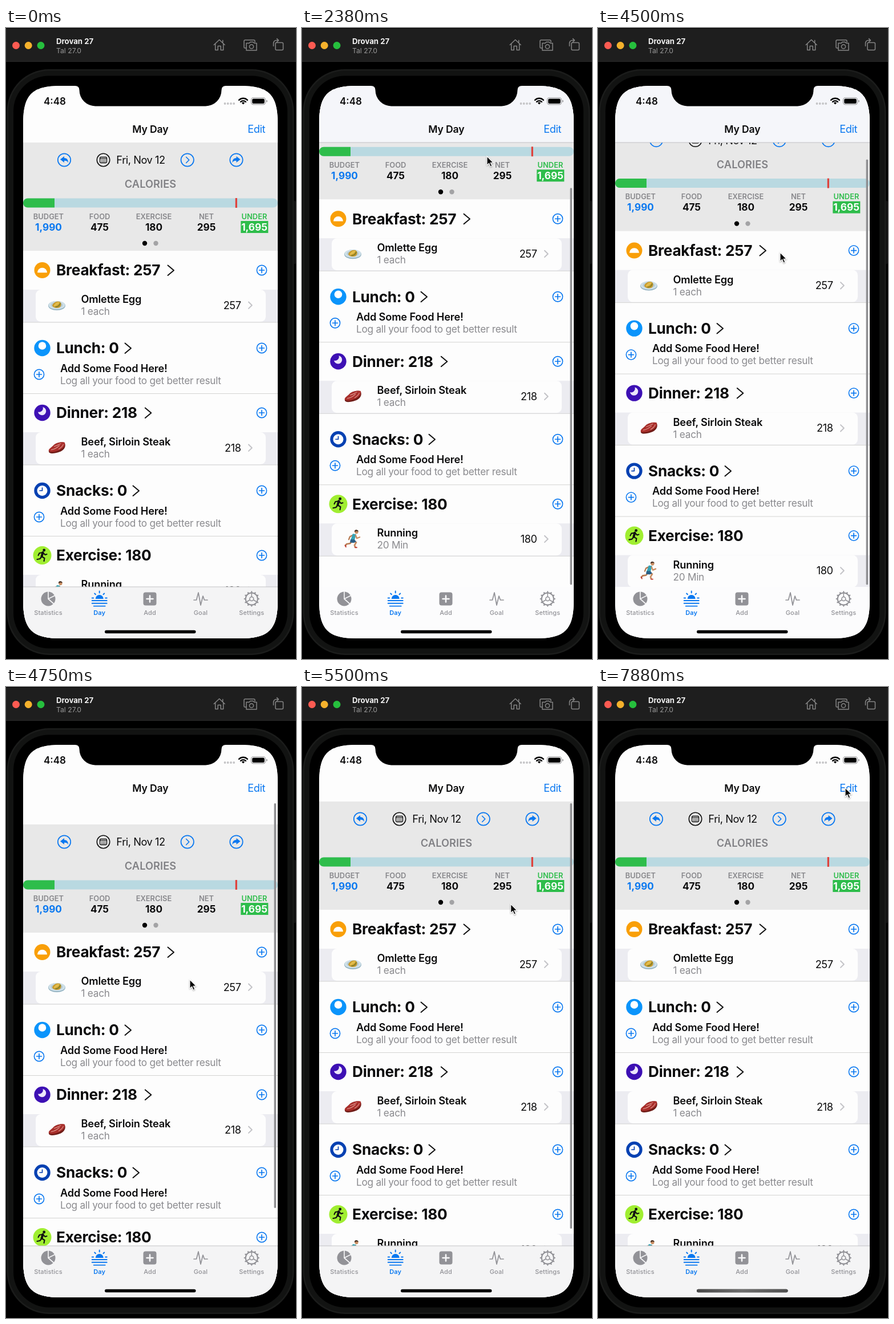
Recreate the animation shown at these times as an HTML page. Size 508 by 1102 pixels, loop 8000 ms.

```html
<!DOCTYPE html>
<html lang="en">
<head>
<meta charset="utf-8">
<title>My Day</title>
<style>
html, body { margin: 0; width: 100%; height: 100%; overflow: hidden; background: #000; }
svg { display: block; width: 100vw; height: 100vh; }
text { font-family: Inter, Roboto, sans-serif; fill: #0b0b0c; white-space: pre; }
.head { font-size: 26.2px; font-weight: 700; letter-spacing: -.01em; }
.name { font-size: 18.2px; font-weight: 600; letter-spacing: -.009em; }
.body { font-size: 18.2px; letter-spacing: -.024em; }
.note { font-size: 17.2px; letter-spacing: -.0145em; fill: #8a8a8e; }
.cap { font-size: 12.9px; font-weight: 600; fill: #87878b; }
.num { font-size: 17.2px; font-weight: 700; }
.tab { font-size: 11px; font-weight: 500; letter-spacing: .01em; fill: #929297; }
.mid { text-anchor: middle; }
.end { text-anchor: end; }
.blue { fill: #0a78f0; }
.line { fill: none; stroke-linecap: round; stroke-linejoin: round; }
</style>
</head>
<body>
<svg id="stage" viewBox="0 0 508 1102" preserveAspectRatio="none"></svg>
<script>
const BLUE = '#0a78f0', GRAY = '#929297', LOOP = 8000, STEP = 125;

const text = (x, y, cls, s, extra = '') => `<text x="${x}" y="${y}" class="${cls}" ${extra}>${s}</text>`;
const rect = (x, y, w, h, fill, r = 0, extra = '') =>
  `<rect x="${x}" y="${y}" width="${w}" height="${h}" rx="${r}" fill="${fill}" ${extra}/>`;
const disc = (x, y, r, fill) => `<circle cx="${x}" cy="${y}" r="${r}" fill="${fill}"/>`;
const line = (d, color, w) => `<path class="line" d="${d}" stroke="${color}" stroke-width="${w}"/>`;
const ring = (x, y, r, color, w) =>
  `<circle cx="${x}" cy="${y}" r="${r}" fill="none" stroke="${color}" stroke-width="${w}"/>`;
const shape = (d, fill) => `<path d="${d}" fill="${fill}"/>`;
const at = (x, y, s, extra = '') => `<g transform="translate(${x} ${y})" ${extra}>${s}</g>`;
const plus = (x, y) => at(x, y, ring(0, 0, 8.6, BLUE, 1.6) + line('M-4.4 0H4.4M0 -4.4V4.4', BLUE, 1.7));
const rule = y => rect(30, y, 446, 1, '#d4d4d2');
const spokes = (n, r1, r2) => Array.from({ length: n }, (_, i) => {
  const a = i * 2 * Math.PI / n - Math.PI / 2, c = Math.cos(a), s = Math.sin(a);
  return `M${(r1 * c).toFixed(2)} ${(r1 * s).toFixed(2)}L${(r2 * c).toFixed(2)} ${(r2 * s).toFixed(2)}`;
}).join('');

// Box with smooth, continuous corners: e is their reach, c the bend
function smoothBox(x, y, w, h, e, c) {
  const r = x + w, b = y + h;
  return `M${x + e} ${y}H${r - e}C${r - c} ${y} ${r} ${y + c} ${r} ${y + e}V${b - e}` +
    `C${r} ${b - c} ${r - c} ${b} ${r - e} ${b}H${x + e}C${x + c} ${b} ${x} ${b - c} ${x} ${b - e}` +
    `V${y + e}C${x} ${y + c} ${x + c} ${y} ${x + e} ${y}Z`;
}

// Small drawings, each centred on 0,0
const egg =
  '<ellipse cy="1" rx="15" ry="8" fill="#8fb0c0"/><ellipse rx="14.5" ry="7.3" fill="#cfe0e8"/>' +
  '<ellipse cy="-.3" rx="10.5" ry="5" fill="#b4cbd6"/>' +
  shape('M-8 1C-7 -4 0 -8 5 -6C9 -4 8 2 5 4C0 6 -6 5 -8 1Z', '#c99a2c') +
  shape('M-5 0C-2 -5 2 -6 5 -5C3 -1 -1 2 -5 2Z', '#e2bd4c') +
  line('M-2 3C2 3 5 0 6 -3', '#6f7a2a', 1.4);
const steak = '<g transform="rotate(-9)">' +
  shape('M-15 5C-15 0 -8 -2 -5 -5C0 -9 12 -9 15 -6C17 1 11 7 3 8C-4 9 -14 10 -15 5Z', '#6f1c17') +
  shape('M-15 3C-14 -1 -8 -2 -5 -5C0 -9 12 -9 15 -7C16 0 10 3 3 5C-5 7 -13 7 -15 3Z', '#a92f2b') +
  line('M-10 2C-5 2 1 0 5 -3M-4 -3C0 -3 4 -5 8 -6M3 3C8 1 11 -2 12 -4', '#dc9088', 1.2) + '</g>';
const runner =
  line('M-1 4L-5 8L-11 9L-13 12', '#b77b52', 2.6) + line('M1 4L6 6L3 11L4 14', '#c98d62', 2.8) +
  line('M1 -7L-5 -4L-7 1', '#b77b52', 2.3) +
  shape('M0 -9L6 -8L3 2L-4 2Z', '#35a3b5') + shape('M-4 1L3 1L6 5L1 7L-5 6Z', '#2b5f86') +
  line('M5 -6L7 -1L12 -3', '#c98d62', 2.4) +
  disc(6.5, -12, 3.1, '#c98d62') + shape('M3 -12C2 -17 9 -17 10 -13L6 -13.6Z', '#4a3325') +
  line('M4 15H7M-13.5 11L-12 14', '#c0392f', 1.8);

const badges = [
  disc(0, 0, 14, '#f99f08') + shape('M-8.5 4.2A8.5 8.5 0 0 1 8.5 4.2Z', '#fff'),
  disc(0, 0, 14.2, '#0b94fb') + disc(0, -4, 6.8, '#fff'),
  disc(0, 0, 14.2, '#3d10b4') + shape('M1 -10A7.2 7.2 0 1 1 -7.5 -1.5A6.8 6.8 0 0 0 1 -10Z', '#ece6fb'),
  disc(0, 0, 14.2, '#0641b2') + disc(0, 0, 9, '#fff') + line('M0 -5V0H-4.5', '#0641b2', 1.7),
  disc(0, 0, 16, '#a0ee31') + disc(3.2, -9, 2.4, '#111') +
    line('M1 -5L-1 2', '#111', 4) + line('M-1 2L4 5L3 10M-1 2L-4 6L-9 7M1 -5L-5 -4L-7 0M2 -4L5 -1L8 -2', '#111', 2.1)
];

function heading(i, y, label, arrow) {
  return at(63.5, y, badges[i]) + text(88, y + 9.3, 'head', label) +
    (arrow ? line(`M${arrow} ${y - 8.5}l10.5 8.7l-10.5 8.7`, '#111', 2) : '') + plus(448, y);
}
function foodRow(y, icon, name, note, value) {
  const mid = y + 61;
  return rect(30, y + 34, 446, 57, '#ececf1') + rect(52, y + 34, 403, 56, '#fdfdfd', 9) +
    at(84.5, mid, disc(0, 0, 11.8, '#fb382e') + line('M-5.2 0H5.2', '#fff', 2), 'class="minus"') +
    `<g class="slide">${at(89, mid, icon)}${text(131.5, y + 57, 'name', name)}${text(131.5, y + 78, 'note', note)}</g>` +
    text(411.5, mid + 6.5, 'body end', value) +
    line(`M425 ${mid - 5.5}l5.8 5.7l-5.8 5.7`, '#c3c3c7', 2) + rule(y + 90.5);
}
function addRow(y) {
  return plus(58, y + 46) + text(95, y + 41.7, 'name', 'Add Some Food Here!') +
    text(95, y + 62.7, 'note', 'Log all your food to get better result') + rule(y + 79);
}

const reply = 'M-7 -1L0 -6.5V-3.5C5 -3.5 7 0 7 5C5.5 2 4 1.3 0 1.3V4.5Z';
function header() {
  const stats = [[74.5, 'BUDGET', '1,990'], [164, 'FOOD', '475'], [259, 'EXERCISE', '180'],
    [351, 'NET', '295'], [435, 'UNDER', '1,695']];
  const colors = { BUDGET: BLUE, UNDER: '#fff' };
  let s = rect(30, 200, 446, 189, '#e8e8e8') +
    at(102, 230.5, ring(0, 0, 11.2, BLUE, 1.7) + shape(reply, BLUE)) +
    at(403.5, 230.5, ring(0, 0, 11.2, BLUE, 1.7) + `<g transform="scale(-1 1)">${shape(reply, BLUE)}</g>`) +
    at(317.7, 230.5, ring(0, 0, 11.2, BLUE, 1.7) + line('M-2 -5L3 0L-2 5', BLUE, 1.7)) +
    at(170.5, 230.5, ring(0, 0, 11.2, '#111', 1.6) +
      rect(-6, -5, 12, 10, 'none', 1.8, 'stroke="#111" stroke-width="1.3"') +
      line('M-6 -2.3H6', '#111', 1.3) +
      '<path d="M-3.8 .3H4.5M-3.8 2.8H4.5" stroke="#111" stroke-width="1.3" stroke-dasharray="1.4 1"/>') +
    text(236, 237, 'body mid', 'Fri, Nov 12') +
    text(253, 279.2, 'name mid', 'CALORIES', 'style="fill:#818185;letter-spacing:.005em"') +
    rect(30, 297.5, 446, 16, '#b9d9e1', 8) +
    shape('M85 297.5V313.5H38A8 8 0 0 1 38 297.5Z', '#2ebd4b') + rect(401.7, 297, 3.2, 17, '#e0403a') +
    rect(411.3, 337, 48, 21, '#2ebd4b') + disc(243, 376, 4.2, '#000') + disc(262.5, 376, 4.2, '#a3a3a5');
  for (const [x, label, value] of stats) {
    s += text(x, 333.5, 'cap mid', label, label === 'UNDER' ? 'style="fill:#2ebd4b"' : '') +
      text(x, 353.6, 'num mid', value, colors[label] ? `style="fill:${colors[label]}"` : '');
  }
  return s;
}

function tabs() {
  const icons = [
    disc(0, 0, 12.5, GRAY) + line('M0 -13V0L9.5 8.5M0 0L12 -6', '#f5f5f6', 1.7),
    shape('M-7 0A7 7 0 0 1 7 0Z', BLUE) +
      line('M0 -13.5V-10.5M-8.5 -9.5L-6.8 -7.7M8.5 -9.5L6.8 -7.7M-13 -1.5H-10.5M13 -1.5H10.5', BLUE, 2) +
      line('M-13 3H13M-13 7.8H13M-10 12.6H10', BLUE, 1.9),
    rect(-11.5, -11.5, 23, 23, GRAY, 4) + line('M-5.5 0H5.5M0 -5.5V5.5', '#f8f8f9', 2.6),
    line('M-12 2H-7.5L-4 -11L0 11L4 -5L6.5 2H12', GRAY, 1.7),
    ring(0, 0, 10.6, GRAY, 2) + line(spokes(12, 11.5, 12.6), GRAY, 2.2) +
      ring(0, 0, 3.4, GRAY, 1.5) + line(spokes(3, 4, 10), GRAY, 1.5)
  ];
  return [[74, 'Statistics'], [163.7, 'Day'], [252, 'Add'], [341, 'Goal'], [430.3, 'Settings']].map(([x, s], i) =>
    at(x, 997, icons[i]) + text(x, 1025, 'tab mid', s, i === 1 ? 'style="fill:#0a78f0;font-weight:600"' : '')).join('');
}

const toolbar =
  rect(0, 1, 508, 58, '#1e1e1e') + rect(0, 58, 508, 1, '#2b2b2b') +
  disc(17.5, 30.5, 6.5, '#fc5b52') + disc(39.2, 30.5, 6.5, '#f5b12c') + disc(61, 30.5, 6.5, '#26bf3d') +
  text(88, 28, '', 'Drovan 27', 'style="font-size:13.2px;font-weight:700;fill:#f2f2f2"') +
  text(88, 44, '', 'Tal 27.0', 'style="font-size:12.2px;fill:#9a9a9a"') +
  at(373.7, 29.5, line('M-9.5 0L0 -9L9.5 0M-7 -2V9H-2.5V2H2.5V9H7V-2M6 -4V-8', '#858585', 1.5)) +
  at(428, 30, line('M-7 5H-9.5Q-11 5 -11 3.5V-7Q-11 -9 -9 -9H6Q8 -9 8 -7V-5.5', '#858585', 1.5) +
    line('M-7 -3.5H-2L0 -5.5H5L7 -3.5H11V9H-7Z', '#858585', 1.5) + ring(2, 2.5, 3.6, '#858585', 1.5)) +
  at(477, 29.5, rect(-5, -4, 13.5, 13, 'none', 2, 'stroke="#858585" stroke-width="1.5"') +
    line('M-8.5 2V-2Q-8.5 -8 -3 -8H0M-2.5 -11L.5 -8L-2.5 -5', '#858585', 1.5));

const device =
  rect(502, 302, 6, 110, '#101010', 2) +
  rect(1.5, 72, 503, 1023, '#1b1c1b', 74) + rect(4, 74.5, 498, 1018, '#121312', 72) +
  rect(13, 83.5, 480, 1000, '#000', 62);

const notch = shape('M121 100V101Q128.5 101 128.5 108.5A28 28 0 0 0 156.5 136.5H349.5A28 28 0 0 0 377.5 108.5Q377.5 101 385 101V100Z', '#000');

const status =
  text(85.5, 133.8, '', '4:48', 'text-anchor="middle" style="font-size:17px;font-weight:600"') +
  [383.5, 388.7, 394, 399.2].map(x => disc(x, 132, 1.9, '#c4c4c6')).join('') +
  at(415.5, 133, line('M-7.4 -7.2A10.6 10.6 0 0 1 7.4 -7.2M-4.5 -4A6.4 6.4 0 0 1 4.5 -4', '#000', 2.4) +
    shape('M0 .5L-2.7 -2.2A3.8 3.8 0 0 1 2.7 -2.2Z', '#000')) +
  rect(429.5, 121.8, 25, 11.8, 'none', 3.6, 'stroke="#9b9b9d" stroke-width="1.1"') +
  rect(431.2, 123.5, 21.6, 8.4, '#000', 2.2) + shape('M456 125.5Q458 126.2 458 127.7Q458 129.2 456 130Z', '#9b9b9d');

const cursorPath = 'M0 0V15.6L3.6 12.3L6.1 18.2L8.8 17L6.3 11.3H11.2Z';

const content = header() +
  heading(0, 423, 'Breakfast: 257', 283.5) + foodRow(423, egg, 'Omlette Egg', '1 each', '257') +
  heading(1, 559, 'Lunch: 0', 208.5) + addRow(559) +
  heading(2, 672, 'Dinner: 218', 243.8) + foodRow(672, steak, 'Beef, Sirloin Steak', '1 each', '218') +
  heading(3, 808, 'Snacks: 0', 222.5) + addRow(808) +
  heading(4, 921, 'Exercise: 180') + foodRow(921, runner, 'Running', '20 Min', '180');

const stage = document.getElementById('stage');
stage.innerHTML =
  `<defs><clipPath id="screen">${shape(smoothBox(30, 101, 446, 965, 66, 15.5), '#fff')}</clipPath>
  <linearGradient id="sheen"><stop offset="0" stop-color="#484848"/><stop offset=".5" stop-color="#6e6e6e"/>
  <stop offset="1" stop-color="#505050"/></linearGradient></defs>` +
  rect(0, 0, 508, 1102, '#000') + toolbar + device +
  `<g clip-path="url(#screen)">${rect(30, 101, 446, 965, '#fdfdfd')}<g id="list">${content}</g>` +
  rect(469.6, 203, 3.4, 743, '#8e8e91', 1.7, 'id="bar"') +
  rect(30, 101, 446, 99, '#fdfdfd') +
  `<g id="navTint">${rect(30, 101, 446, 99, '#f5f6fa')}${rect(30, 199.5, 446, 1, '#c2c2c6')}</g>` +
  text(252.8, 182.8, 'name mid', 'My Day', 'style="font-size:17.6px"') + text(454, 182.8, 'body end blue', 'Edit', 'id="mode"') +
  status + rect(30, 976, 446, 90, '#fcfcfd') +
  `<g id="tabTint">${rect(30, 976, 446, 90, '#f4f4f5')}${rect(30, 975.5, 446, 1, '#c4c4c6')}</g>` + tabs() +
  rect(173, 1051.8, 159.5, 5.4, '#000', 2.7) + rect(173, 1051.8, 159.5, 5.4, 'url(#sheen)', 2.7, 'id="shine"') + '</g>' +
  notch +
  `<path id="cursor" d="${cursorPath}" fill="#000" stroke="#fff" stroke-width="1.2" style="filter:drop-shadow(0 1px 1px rgba(0,0,0,.35))"/>`;

const get = id => document.getElementById(id);
const list = get('list'), bar = get('bar'), mode = get('mode'), cursor = get('cursor');
const navTint = get('navTint'), tabTint = get('tabTint'), shine = get('shine');
const slides = stage.querySelectorAll('.slide'), minuses = stage.querySelectorAll('.minus');
const minusY = [484, 733, 982];

const clamp = v => Math.max(0, Math.min(1, v));
// Eased value of a track of [time, value] keys
function track(keys, t) {
  if (t <= keys[0][0]) return keys[0][1];
  for (let i = 1; i < keys.length; i++) {
    const [t0, a] = keys[i - 1], [t1, b] = keys[i];
    if (t <= t1) {
      const p = (t - t0) / (t1 - t0);
      return a + (b - a) * p * p * (3 - 2 * p);
    }
  }
  return keys[keys.length - 1][1];
}

const END = 34.4;
const scrollKeys = [[1625, 0], [2125, 100], [2250, 100], [2750, END], [4500, END], [4750, -40], [5000, -11], [5375, 0]];
const barKeys = [[1500, 0], [1625, 1], [6250, 1], [6625, 0]];
const editKeys = [[6125, 0], [6375, 1], [7250, 1], [7500, 0]];
const xKeys = [[875, 420], [1375, 279], [1625, 281], [2125, 324], [3250, 324], [4250, 319], [4500, 319], [4750, 322], [5125, 322], [6000, 433]];
const yKeys = [[875, 640], [1375, 505], [1625, 505], [2125, 224], [3250, 224], [4250, 392], [4500, 392], [4750, 511], [5125, 511], [6000, 176]];

function draw(t) {
  const scroll = track(scrollKeys, t), edit = track(editKeys, t);
  list.setAttribute('transform', `translate(0 ${-scroll})`);
  navTint.setAttribute('opacity', clamp(scroll / 12));
  tabTint.setAttribute('opacity', clamp((END - scroll) / 12));

  const inside = Math.max(0, Math.min(END, scroll)), over = Math.abs(scroll - inside);
  const top = 203 + inside * .77 + (scroll > END ? over * .9 : 0);
  bar.setAttribute('y', top);
  bar.setAttribute('height', 743 - over * .9);
  bar.setAttribute('opacity', track(barKeys, t));

  slides.forEach(g => g.setAttribute('transform', `translate(${46 * edit} 0)`));
  minuses.forEach((g, i) => {
    g.setAttribute('transform', `translate(${84.5 - 30 * (1 - edit)} ${minusY[i]})`);
    g.setAttribute('opacity', edit);
  });
  mode.textContent = t >= 6125 && t < 7250 ? 'Done' : 'Edit';

  cursor.setAttribute('visibility', t >= 875 ? 'visible' : 'hidden');
  cursor.setAttribute('transform', `translate(${track(xKeys, t)} ${track(yKeys, t)})`);
  shine.setAttribute('opacity', track([[7625, 0], [7875, 1]], t));
}

const start = performance.now();
function tick() {
  const t = (performance.now() - start) % LOOP;
  draw(Math.floor(t / STEP) * STEP);
  requestAnimationFrame(tick);
}
draw(0);
requestAnimationFrame(tick);
</script>
</body>
</html>
```
